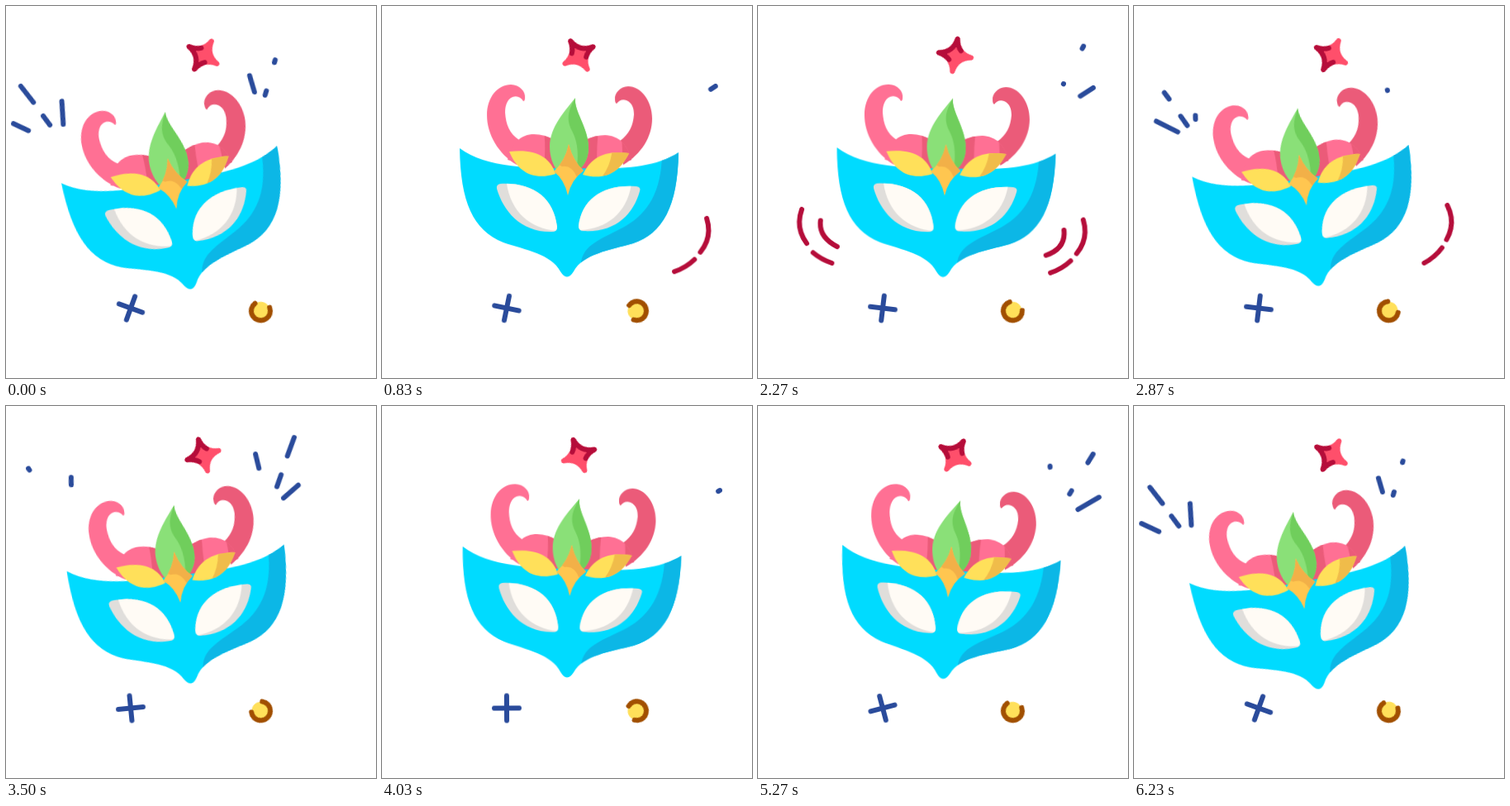
These frames come from a looping animation (448 by 450 pixels, 6260 ms). An HTML page:

```html
<!DOCTYPE html>
<html lang="en">
<head>
<meta charset="utf-8">
<title>Carnival mask</title>
<style>
  @property --head { syntax: "<number>"; inherits: false; initial-value: 0; }
  @property --tail { syntax: "<number>"; inherits: false; initial-value: 0; }

  :root { --half: 1565ms; --ease: cubic-bezier(.333, 0, .667, 1); }
  html, body { margin: 0; width: 100%; height: 100%; overflow: hidden; background: #fff; }
  svg { display: block; width: 100vw; height: 100vh; }

  .bob, .swing, .spin { animation: var(--half) var(--ease) infinite alternate; }
  .bob { animation-name: bob; animation-duration: calc(var(--half) / 2); }
  .swing { animation-name: turn; transform-origin: 224px 327px; --from: -10deg; --to: 10deg; }
  .spin { animation-name: turn; animation-delay: var(--delay, 0ms); transform-origin: 0 0; }
  .plus { --from: 20deg; --to: -160deg; }
  .star { --from: -199deg; --to: -23deg; --delay: -165ms; }
  .ring { --from: -32deg; --to: -208deg; --delay: -498ms; }
  @keyframes bob { from { transform: translateY(15px); } to { transform: none; } }
  @keyframes turn { from { transform: rotate(var(--from)); } to { transform: rotate(var(--to)); } }

  .line { fill: none; stroke-width: 6; stroke-linecap: round; stroke-linejoin: round; }
  .blue { stroke: #2a4b9b; }
  .red { stroke: #b50d3a; }
  .pink { stroke: #ff4f6b; }

  /* Each ray grows outwards, then its tail catches up. */
  .ray {
    stroke-dasharray: calc(max(0, var(--head) - var(--tail)) * 1px) 400px;
    stroke-dashoffset: calc(var(--tail) * -1px);
    animation: var(--half) var(--at) infinite;
    animation-name: head, tail, show;
    animation-timing-function: var(--ease), var(--ease), step-end;
  }
  @keyframes head { 0% { --head: 0; } 40%, 100% { --head: 100; } }
  @keyframes tail { 0%, 20% { --tail: 0; } 60%, 100% { --tail: 100; } }
  @keyframes show { 0% { opacity: 1; } 59.5%, 100% { opacity: 0; } }

  .long, .short { animation: calc(var(--half) / 3) step-end infinite; }
  .long { animation-name: long; }
  .short { animation-name: short; }
  @keyframes long { 0%, 66% { opacity: 0; } 11.4% { opacity: 1; } }
  @keyframes short { 0%, 47% { opacity: 0; } 11.4% { opacity: 1; } }
</style>
</head>
<body>
<svg viewBox="0 0 448 450">
  <defs>
    <path id="face" d="M94 172C127 196 180 196 226 196C274 197 325 199 359 177C358 242 340 275 304 287C276 295 243 300 232 321Q224 334 216 321C205 300 174 295 147 286C110 271 95 237 94 172Z"/>
    <path id="eyeL" d="M143 215C183 213 208 232 212 267Q212 273 206 273C168 274 147 248 139 221Q138 216 143 215Z"/>
    <path id="eyeR" d="M308 218C268 215 242 233 238 266Q238 272 244 272C283 274 304 252 312 224Q314 219 308 218Z"/>
    <path id="leaf" d="M234 111C232 127 250 147 250 171C250 184 245 192 238 199L212 199C207 192 203 182 203 170C203 146 222 126 234 111Z"/>
    <path id="petal" d="M243 204C251 186 267 173 299 178C289 198 273 212 243 204Z"/>
    <path id="gem" d="M226 167Q231 187 244 199Q229 210 225 229Q221 210 208 200Q222 187 226 167Z"/>
    <path id="moundL" d="M152 186C158 165 168 155 184 155Q197 155 208 162L213 202Z"/>
    <path id="moundR" d="M246 162Q258 156 270 156C286 157 296 165 302 186L238 202Z"/>
    <clipPath id="inFace"><use href="#face"/></clipPath>
    <clipPath id="inEyeL"><use href="#eyeL"/></clipPath>
    <clipPath id="inEyeR"><use href="#eyeR"/></clipPath>
    <clipPath id="inLeaf"><use href="#leaf"/></clipPath>
    <clipPath id="inPetal"><use href="#petal"/></clipPath>
    <clipPath id="inGem"><use href="#gem"/></clipPath>
    <clipPath id="inMoundL"><use href="#moundL"/></clipPath>
    <clipPath id="inMoundR"><use href="#moundR"/></clipPath>
  </defs>

  <g class="bob"><g class="swing">
    <g transform="rotate(-.9 224 327)">
      <path fill="#ff7094" d="M163 192C141 179 127 155 127 132C127 110 140 95 156 95C167 95 174 104 173 111Q173 115 171 115C168 110 163 108 158 110C151 113 149 121 149 129C150 143 154 154 166 162Z"/>
      <path fill="#eb5b79" d="M292 192C314 179 327 158 327 136C327 114 313 97 298 97C288 97 281 106 282 113Q282 117 284 118C287 114 291 112 296 114C303 117 305 124 305 131C304 145 299 155 288 163Z"/>
      <use href="#moundL" fill="#ff7094"/>
      <path clip-path="url(#inMoundL)" fill="#eb5b79" d="M196 150Q199 175 195 205H215V150Z"/>
      <use href="#moundR" fill="#ff7094"/>
      <path clip-path="url(#inMoundR)" fill="#eb5b79" d="M262 150Q259 175 261 205H235V150Z"/>
      <path clip-path="url(#inMoundR)" fill="#eb5b79" d="M288 150Q294 175 288 205H310V150Z"/>

      <use href="#face" fill="#00dbff"/>
      <path clip-path="url(#inFace)" fill="#0cb7e6" d="M339 180C338 223 323 250 295 266C268 281 242 288 241 312L300 330L370 270V170Z"/>

      <use href="#eyeL" fill="#e0dedb"/>
      <path clip-path="url(#inEyeL)" fill="#fffbf5" d="M150 205C152 246 177 269 212 272L230 250L200 205Z"/>
      <use href="#eyeR" fill="#e0dedb"/>
      <path clip-path="url(#inEyeR)" fill="#fffbf5" d="M303 205C301 246 276 269 240 271L225 250L255 205Z"/>

      <use href="#leaf" fill="#8ae078"/>
      <path clip-path="url(#inLeaf)" fill="#70ce5c" d="M234 111C226 125 222 137 230 151C238 166 238 182 235 202H260V111Z"/>
      <path fill="#ffe05a" d="M154 176C184 172 204 182 210 203C184 211 165 202 154 176Z"/>
      <use href="#petal" fill="#ffe05a"/>
      <path clip-path="url(#inPetal)" fill="#f0bc4a" d="M279 170Q278 194 262 212H305V170Z"/>
      <use href="#gem" fill="#ffc650"/>
      <path clip-path="url(#inGem)" fill="#f2b048" d="M226 160L248 199L236 207Q230 192 218 194L210 190Z"/>
    </g>

    <g transform="translate(224 327)">
      <g class="line blue">
        <g transform="scale(-1 1)">
          <path class="ray" pathLength="100" style="--at:-650ms" d="M140-208L177-234"/>
          <path class="ray" pathLength="100" style="--at:-600ms" d="M129-215L140-237"/>
          <path class="ray" pathLength="100" style="--at:-471ms" d="M146-250L163-282"/>
          <path class="ray" pathLength="100" style="--at:-385ms" d="M118-221L113-265"/>
        </g>
        <path class="ray" pathLength="100" style="--at:-297ms" d="M117-221L112-265"/>
        <path class="ray" pathLength="100" style="--at:-190ms" d="M129-215L140-237"/>
        <path class="ray" pathLength="100" style="--at:-115ms" d="M147-252L163-283"/>
        <path class="ray" pathLength="100" style="--at:-1520ms" d="M139-208L176-233"/>
      </g>
      <g class="line red">
        <path class="long" d="M168-73Q175.500-50.500 161-32M154-23Q144-13 130-8"/>
        <path class="short" d="M145-60Q148-38 124-29"/>
        <path class="short" transform="translate(-5 -4) scale(-1 1)" d="M168-73Q175.500-50.500 161-32M153-21Q143-13 130-9M145-60Q147-40 124-29"/>
      </g>
    </g>
  </g></g>

  <g transform="translate(238.500 59.500)"><g class="spin star line">
    <path class="pink" fill="#ff4f6b" d="M-14-14Q0-4 14-14Q4 0 14 14Q0 4-14 14Q-4 0-14-14Z"/>
    <path class="red" d="M0-9Q7-9 14-14Q4 0 14 14Q7 9 0 9"/>
  </g></g>

  <g transform="translate(151 365.500)">
    <path class="spin plus line blue" d="M-15 0H15M0-15V15"/>
  </g>

  <g transform="translate(308.500 368.800)"><g class="spin ring">
    <circle r="11" fill="#ffe05a"/>
    <path class="line" stroke="#a14f00" d="M6.900 9.200A11.500 11.500 0 1 1 6.900-9.200"/>
  </g></g>
</svg>
</body>
</html>
```
